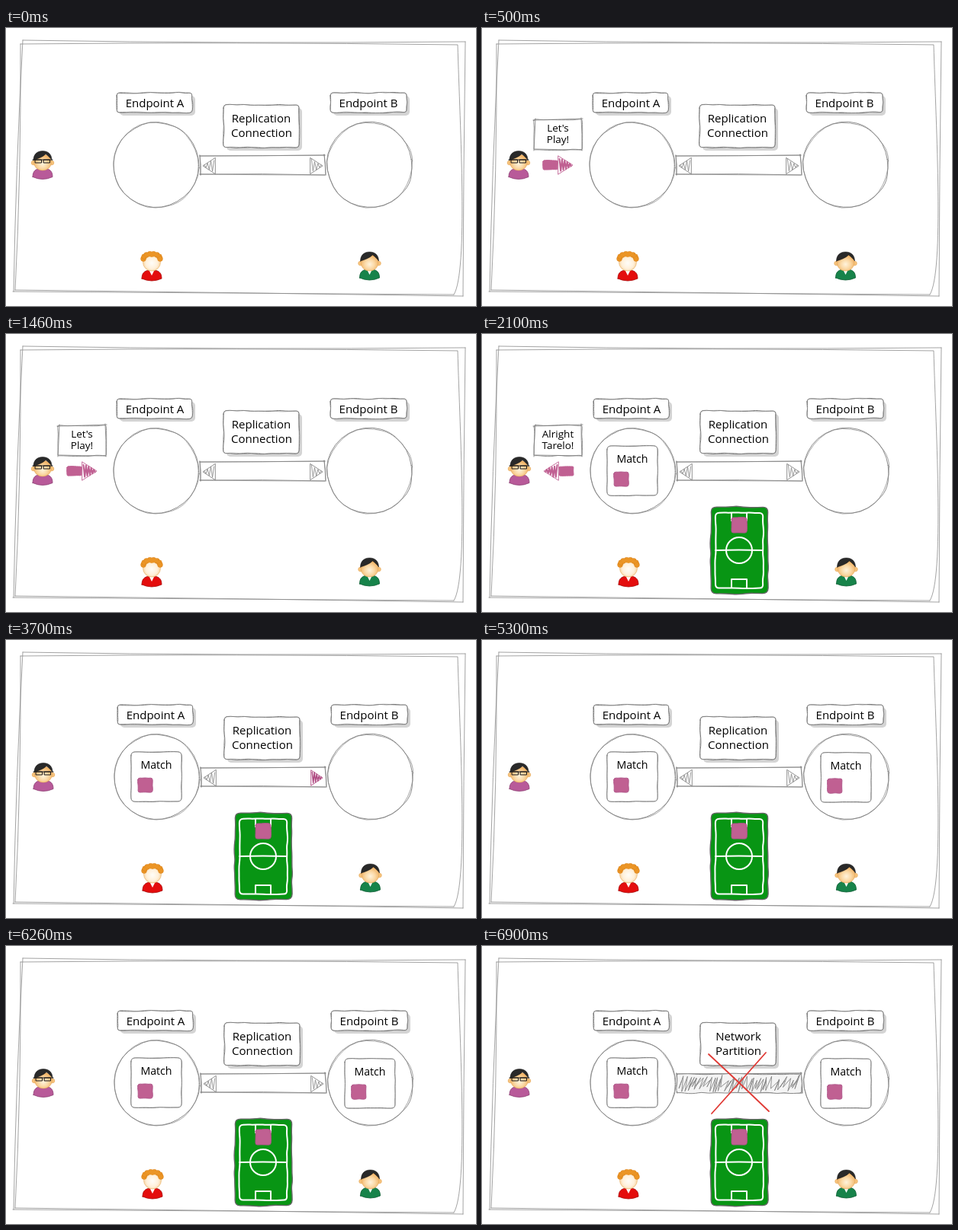
Animation of 616 by 365 pixels, one loop 8000 ms. Source, as an HTML page:

```html
<!DOCTYPE html>
<html lang="en">
<head>
<meta charset="utf-8">
<title>Replication sketch</title>
<style>
  html, body { margin: 0; width: 100%; height: 100%; overflow: hidden; background: #fff; }
  svg { display: block; width: 616px; height: 365px; }
  text { font: 15px "Open Sans", Lato, sans-serif; text-anchor: middle; fill: #000; }
  .small { font-size: 13.5px; }
  .match { font-size: 14.2px; }
</style>
</head>
<body>
<svg id="stage" viewBox="0 0 616 365">
  <defs>
    <radialGradient id="skin" cx=".5" cy=".6" r=".55">
      <stop offset="0" stop-color="#fff3dc"/>
      <stop offset=".5" stop-color="#fbd9a6"/>
      <stop offset="1" stop-color="#efb163"/>
    </radialGradient>
    <radialGradient id="pale" cx=".5" cy=".55" r=".55">
      <stop offset="0" stop-color="#fffdf8"/>
      <stop offset=".6" stop-color="#fff0da"/>
      <stop offset="1" stop-color="#f6cf95"/>
    </radialGradient>
  </defs>
</svg>
<script>
const LOOP = 8000, END = LOOP, PINK = '#c06092', INK = '#828282';
const stage = document.getElementById('stage');

let seed = 7;
const rand = () => (seed = (seed * 16807) % 2147483647) / 2147483647;
const jitter = a => (rand() * 2 - 1) * a;
const n = v => v.toFixed(1);
const at = p => n(p[0]) + ' ' + n(p[1]);
const mid = (a, b) => [(a[0] + b[0]) / 2, (a[1] + b[1]) / 2];

const path = (d, stroke = INK, width = 1, fill = 'none') =>
  `<path d="${d}" fill="${fill}" stroke="${stroke}" stroke-width="${width}" stroke-linejoin="round" stroke-linecap="round"/>`;
const shape = (d, fill) => path(d, 'none', 0, fill);
const poly = (pts, close) => 'M' + pts.map(at).join('L') + (close ? 'Z' : '');
const label = (x, y, s, cls = '') => `<text x="${x}" y="${y}" class="${cls}">${s}</text>`;

// Closed smooth curve through the midpoints of a point ring
function smooth(pts) {
  let d = 'M' + at(mid(pts[pts.length - 1], pts[0]));
  pts.forEach((p, i) => d += `Q${at(p)} ${at(mid(p, pts[(i + 1) % pts.length]))}`);
  return d + 'Z';
}

// Open hand-drawn line, slightly bowed
function stroke(x1, y1, x2, y2, bow = 1) {
  const [mx, my] = mid([x1, y1], [x2, y2]);
  return `M${x1} ${y1}Q${n(mx + jitter(bow))} ${n(my + jitter(bow))} ${x2} ${y2}`;
}

function ring(x1, y1, x2, y2, r, amp) {
  const corners = [[x1, y1], [x2, y1], [x2, y2], [x1, y2]], pts = [];
  corners.forEach((a, i) => {
    const b = corners[(i + 1) % 4], len = Math.hypot(b[0] - a[0], b[1] - a[1]);
    const steps = Math.max(2, Math.round((len - 2 * r) / 9));
    pts.push(a);
    for (let k = 0; k <= steps; k++) {
      const f = (r + (len - 2 * r) * k / steps) / len;
      pts.push([a[0] + (b[0] - a[0]) * f + jitter(amp), a[1] + (b[1] - a[1]) * f + jitter(amp)]);
    }
  });
  return pts;
}
const box = (x1, y1, x2, y2, r = 8, amp = 1) => smooth(ring(x1, y1, x2, y2, r, amp));

function card(x1, y1, x2, y2) {
  const shadow = `<rect x="${x1 + 4}" y="${y1 + 4}" width="${x2 - x1}" height="${y2 - y1}" rx="5" fill="#d4d4d4"/>`;
  return shadow + path(box(x1, y1, x2, y2), '#777', 1, '#fff') + path(box(x1, y1, x2, y2), '#888', .6);
}

function roughCircle(cx, cy, r) {
  const loop = () => {
    const turn = rand();
    return smooth(Array.from({ length: 16 }, (_, i) => {
      const a = (i + turn) / 16 * Math.PI * 2, q = r + 1 + jitter(1.3);
      return [cx + q * Math.cos(a), cy + q * Math.sin(a)];
    }));
  };
  return path(loop(), INK, .9, '#fff') + path(loop(), INK, .7);
}

function sketchRect(x1, y1, x2, y2) {
  const side = (a, b, c, d) => stroke(a, b, c, d) + stroke(a, b, c, d, 2);
  return shape(`M${x1} ${y1}H${x2}V${y2}H${x1}Z`, '#fff') +
    path(side(x1, y1 + 1, x2, y1) + side(x2 - 1, y1 - 1, x2 + 1, y2) +
         side(x2, y2, x1, y2 - 1) + side(x1 + 1, y2, x1, y1), INK, .8);
}

// Triangle filled with a slanted scribble
function scribbleHead(tip, base, cy, half, color, width, count) {
  const pts = [];
  for (let i = 0; i <= count; i++) {
    const f = .08 + .8 * i / count, up = i % 2 ? 1 : -1;
    pts.push([base + (tip - base) * f, cy + up * half * (1 - f) * (.7 + .3 * rand())]);
  }
  const tri = [[base, cy - half], [tip, cy], [base, cy + half]];
  return path(poly(tri, true), color, .9) + path(poly(pts), color, width);
}
const smallHead = (tip, base) => scribbleHead(tip, base, 181, 10.5, '#858585', .8, 6);

function bigArrow(tip, base, from, to) {
  return path(box(from, 174, to, 186, 3, .5), PINK, 1, PINK) + scribbleHead(tip, base, 180, 12, PINK, 2, 9);
}

const bubble = (a, b) => path(box(68, 120, 131, 160, 3), '#888', .9, '#fff') +
  path(stroke(67, 121, 132, 119) + stroke(130, 118, 131, 161) + stroke(131, 160, 69, 159) + stroke(68, 161, 70, 119), '#777', .8) +
  label(99.5, 136, a, 'small') + label(99.5, 151, b, 'small');

const pinkSquare = (x, y, s = 19) => path(box(x, y, x + s, y + s, 5, .5), '#b0568a', 1, PINK);
const match = (x, y) => path(box(x, y, x + 66, y + 65, 10, .7), '#777', 1, '#fff') +
  path(box(x, y, x + 66, y + 65, 10, .5), '#999', .6) +
  label(x + 33, y + 22, 'Match', 'match') + pinkSquare(x + 9, y + 34);

function field() {
  const white = d => path(d, '#fff', 2);
  return path(box(300, 227, 375, 341, 15), '#666', 1.4, '#089514') +
    white(box(306, 235, 368.5, 333.5, 10, .8)) + white(stroke(306, 284, 368, 284)) +
    white('M320 284a17 17 0 1 0 34 0a17 17 0 1 0 -34 0') +
    white('M327 235V245H347V235M327 333V322H347V333') + pinkSquare(327, 241, 20);
}

function person(x, y, neck, shirt, dark, head, collar = '') {
  const body = `M-13 ${neck + 11}C-13 ${neck + 3} -9 ${neck + 1} -4 ${neck}H4C9 ${neck + 1} 13 ${neck + 3} 13 ${neck + 11}Q0 ${neck + 17} -13 ${neck + 11}Z`;
  const vee = collar && shape(`M-4 ${neck - 1}L0 ${neck + 7}L4 ${neck - 1}Z`, collar);
  return `<g transform="translate(${x} ${y})">${path(body, dark, .8, shirt)}${vee}${head}</g>`;
}
const ears = y => `<g fill="#f7c47e" stroke="#e3a351" stroke-width=".6">
  <circle cx="-12" cy="${y}" r="2.8"/><circle cx="12" cy="${y}" r="2.8"/></g>`;
const face = (cy, ry, fill = 'skin') =>
  `<ellipse cy="${cy}" rx="11.5" ry="${ry}" fill="url(#${fill})" stroke="#e3a351" stroke-width=".5"/>`;
const darkHair = path('M-12 12C-12 4 -7 0 0 0S12 4 12 12C10 9 7 6 4 4C0 8 -6 10 -12 12Z', '#111', .5, '#292929');
const glasses = path('M-13 11.5H13M-9.5 11.5H-1.5V15.5H-9.5ZM1.5 11.5H9.5V15.5H1.5Z', '#181818', 1);
const curls = '<g fill="#eb9526" stroke="#d67d15" stroke-width=".5">' +
  Array.from({ length: 8 }, (_, i) => {
    const a = Math.PI * (1 + i / 7);
    return `<circle cx="${n(11 * Math.cos(a))}" cy="${n(10 + 6.5 * Math.sin(a))}" r="3.4"/>`;
  }).join('') + '</g>' + shape('M-11 9Q-8 1 0 1T11 9Q5 5 0 8Q-5 5 -11 9Z', '#eb9526');

function partition() {
  const pts = [];
  for (let x = 256, i = 0; x < 414; x += rand() * 3.6, i++)
    pts.push([Math.min(417, x + (i % 2 ? 0 : 3 + rand() * 6)), i % 2 ? 192 - rand() * 8 : 169 + rand() * 8]);
  const cross = stroke(297, 142, 376, 217, 1) + stroke(372, 140, 301, 220, 1);
  return path(box(255, 168, 419, 193, 6), '#888', 1, '#f4f4f4') + path(poly(pts), '#868686', .9) + path(cross, '#e03a35', 1.8);
}

const parts = [];
function during(from, to, markup) {
  parts.push({ id: 'p' + parts.length, from, to });
  return `<g id="p${parts.length - 1}">${markup}</g>`;
}

const border = path(
  'M22 16Q300 21 602 18' + stroke(602, 18, 599, 352) + stroke(599, 352, 12, 344) +
  'M10 346Q13 180 22 16M19 21Q300 18 592 22C595 130 606 320 587 350' +
  stroke(587, 350, 9, 346) + 'M12 344Q20 190 19 21', '#8c8c8c', .8);

const scene =
  sketchRect(254, 167, 418, 193) +
  during(0, 6900, smallHead(258, 274)) +
  during(0, 3700, smallHead(415, 399)) +
  during(3700, 5300, scribbleHead(414, 399, 181, 10, '#b04a82', 1.5, 8)) +
  during(5300, 6900, smallHead(415, 399)) +
  roughCircle(196.5, 180, 56) + roughCircle(477, 180, 56) +
  card(145, 85, 244, 111) + label(195, 103.5, 'Endpoint A') +
  card(425, 85, 525, 111) + label(475, 103.5, 'Endpoint B') +
  card(285, 101, 384, 157) +
  during(0, 6900, label(334.5, 124, 'Replication') + label(335, 142.5, 'Connection')) +
  during(6900, END, label(335, 124, 'Network') + label(335, 142.5, 'Partition')) +
  person(48, 161.5, 23, '#b85a99', '#8d3f74', ears(15.5) + face(15, 10.5) + darkHair + glasses) +
  person(191, 293, 25, '#e40d0d', '#a80808', face(14.5, 11.5, 'pale') + curls, '#fff') +
  person(476.5, 294, 23, '#17834a', '#0c5c31', ears(15) + face(14, 11) + darkHair, '#fff');

stage.insertAdjacentHTML('beforeend', border + `<g id="scene">${scene}</g>` +
  during(500, 2100, bubble('Let\'s', 'Play!') + bigArrow(119, 100, 80, 99)) +
  during(2100, 3700, bubble('Alright', 'Tarelo!') + bigArrow(81, 100, 101, 120)) +
  during(2100, END, match(164, 147) + field()) +
  during(5300, END, match(444, 148)) +
  during(6900, END, partition()));

const sceneNode = document.getElementById('scene');
parts.forEach(p => p.node = document.getElementById(p.id));

function draw(t) {
  sceneNode.setAttribute('transform', `translate(${t >= 2100 ? 1 : 0} 0)`);
  for (const p of parts) p.node.style.display = t >= p.from && t < p.to ? '' : 'none';
}

const start = performance.now();
function tick() {
  draw((performance.now() - start) % LOOP);
  requestAnimationFrame(tick);
}
tick();
</script>
</body>
</html>
```
